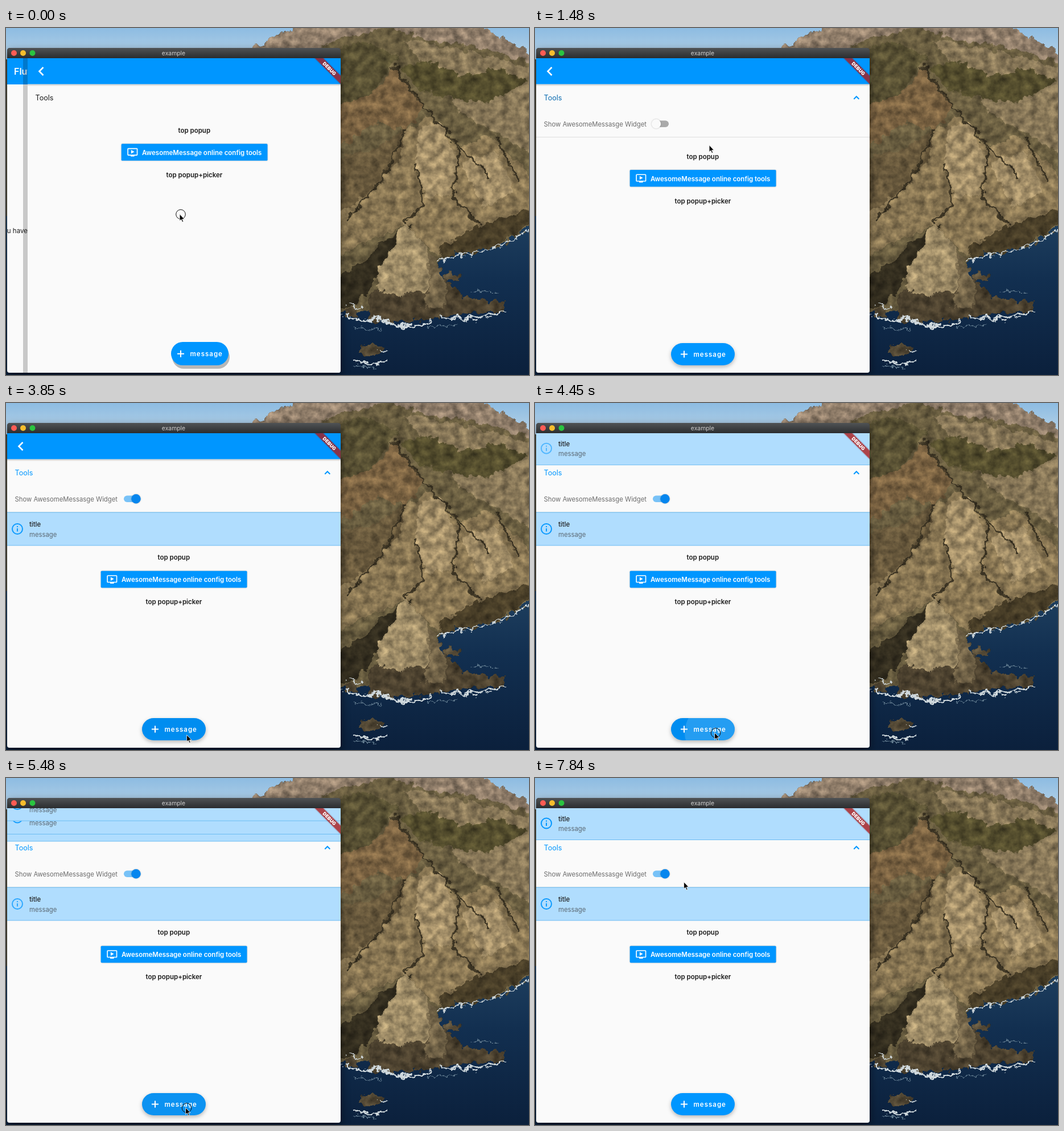
An HTML page for the animation above (7990 ms loop, 919 by 609 pixels).

```html
<!DOCTYPE html>
<html lang="en">
<head>
<meta charset="utf-8">
<title>Message popup demo</title>
<style>
  html, body { margin: 0; width: 100%; height: 100%; overflow: hidden; background: #10284a; }
  svg { position: absolute; inset: 0; width: 919px; height: 609px; }
  text { font: 11.5px Inter, Roboto, sans-serif; fill: #1c1c1c; white-space: pre; }
  .medium { font-weight: 500; }
  .bold { font-weight: 600; }
  .center { text-anchor: middle; }
  .white { fill: #fff; }
  .line { fill: none; stroke-width: 2; }
  .raised { filter: drop-shadow(0 .8px .8px #0004); }
  #notice .icon { opacity: var(--pulse); }
</style>
</head>
<body>

<!-- Coast -->
<svg viewBox="0 0 919 609">
  <defs>
    <linearGradient id="sky" x2="0" y2="1">
      <stop stop-color="#8dbce2"/><stop offset="1" stop-color="#c3d8e7"/>
    </linearGradient>
    <linearGradient id="sea" x2="0" y2="1">
      <stop stop-color="#1f4060"/><stop offset=".4" stop-color="#122f50"/><stop offset="1" stop-color="#0b203c"/>
    </linearGradient>
    <filter id="rock" x="0" y="0" width="919" height="609" filterUnits="userSpaceOnUse" color-interpolation-filters="sRGB">
      <feTurbulence type="fractalNoise" baseFrequency=".07" numOctaves="5" seed="8" result="noise"/>
      <feDisplacementMap in="SourceGraphic" in2="noise" scale="20" xChannelSelector="R" yChannelSelector="G" result="rough"/>
      <feColorMatrix in="noise" values="1 0 0 0 0  1 0 0 0 0  1 0 0 0 0  0 0 0 0 1" result="grain"/>
      <feComposite in="rough" in2="grain" operator="arithmetic" k1=".9" k2=".52" result="lit"/>
      <feComposite in="lit" in2="rough" operator="in"/>
    </filter>
    <filter id="spray" x="0" y="0" width="919" height="609" filterUnits="userSpaceOnUse">
      <feTurbulence type="fractalNoise" baseFrequency=".09" numOctaves="3" seed="3" result="noise"/>
      <feDisplacementMap in="SourceGraphic" in2="noise" scale="18" xChannelSelector="R" yChannelSelector="G"/>
    </filter>
  </defs>
  <rect width="919" height="70" fill="url(#sky)"/>
  <rect y="55" width="919" height="285" fill="#4b4736"/>
  <rect y="330" width="919" height="279" fill="url(#sea)"/>
  <g filter="url(#rock)">
    <path fill="#93806c" d="M425 40L465 18 500 2 530-15H800L860 8 930 50V120H425Z"/>
    <path fill="#6c6042" d="M530 50L565 25 610 14 670-3 740 22 820 30 930 62V345L860 385 770 402 690 490 580 498V50Z"/>
    <path fill="#8b7a5a" d="M700 20L800 38 930 72V225L870 190 800 150 730 60Z"/>
    <path fill="#57502f" d="M690 70L745 58 800 85 870 70 915 95 850 130 790 125 730 110Z"/>
    <path fill="#5b5335" d="M575 40L630 22 690 50 660 85 640 125 580 140Z"/>
    <path fill="#7f6644" d="M575 140L650 112 680 68 735 140 700 180 650 165 580 215Z"/>
    <path fill="#8c7955" d="M690 185L745 155 795 210 850 190 925 260V340L850 385 760 400 700 345 580 400V310L660 260Z"/>
    <path fill="#a6916a" d="M725 175L765 165 792 230 780 290 740 300 720 240ZM800 235L860 215 895 285 840 315Z"/>
    <path fill="#6b5b3e" d="M575 230L640 215 700 180 690 230 635 290 580 330Z"/>
    <path fill="#4b4029" d="M760 385L835 345 925 318V345L850 388 765 404Z"/>
    <path fill="#352f20" d="M575 445L620 415 665 372 712 345 680 400 640 455 610 490 575 490Z"/>
    <path fill="#4e4330" d="M635 470L690 440 760 430 800 470 875 482 875 498 790 503 720 515 640 515Z"/>
    <path fill="#a3906a" d="M700 342L740 385 758 435 740 462 700 470 655 462 650 435 680 385Z"/>
    <path fill="#75664a" d="M740 385L775 450 770 495 730 485 745 460Z"/>
    <path fill="#554a36" d="M622 560L645 550 662 566 650 577 625 578ZM595 493L615 490 618 506 597 506ZM770 432L795 430 797 442 772 444Z"/>
    <path fill="none" stroke="#3d3524" stroke-width="4" d="M680 65L735 140 790 200 850 260M700 180L665 260 600 335M720 240L735 310 700 342M795 210L785 300 830 340M860 190L900 270"/>
  </g>
  <g filter="url(#spray)" fill="none" stroke="#cfd8dc" stroke-linecap="round">
    <path stroke-width="4" d="M592 502L625 515 655 509 690 524 735 521 745 512"/>
    <path stroke-width="3" d="M765 507L800 511 845 506 878 497M612 583L640 590 668 584"/>
    <path stroke-width="2" d="M760 408L805 398 850 390 890 370 922 352M655 563L668 570M600 485L625 492"/>
    <path stroke="#6d8799" stroke-width="1.5" d="M610 525L660 530M745 525L790 521M820 460L865 466M650 597L610 592"/>
  </g>
</svg>

<!-- App window -->
<svg viewBox="0 0 919 609">
  <defs>
    <linearGradient id="bar" x2="0" y2="1"><stop stop-color="#505355"/><stop offset="1" stop-color="#2b2d2f"/></linearGradient>
    <linearGradient id="fade" x2="0" y2="1"><stop stop-color="#0003"/><stop offset="1" stop-color="#0000"/></linearGradient>
    <clipPath id="body"><path d="M2 53H588V601Q588 605 584 605H6Q2 605 2 601Z"/></clipPath>
    <clipPath id="panelClip"><rect id="panelArea" x="2" y="145" width="586"/></clipPath>
    <clipPath id="widgetClip"><rect id="widgetArea" x="2" y="191" width="586"/></clipPath>
    <clipPath id="fabClip"><rect id="fabArea" rx="20.5"/></clipPath>
    <g id="notice">
      <rect x="1" width="588" y=".5" height="58" fill="#b0ddfe" stroke="#6dbcf3"/>
      <g class="icon" stroke="#0096ff">
        <circle class="line" cx="20" cy="29.5" r="9"/>
        <path class="line" d="M20 28.5V34M20 24.5V26.5"/>
      </g>
      <text class="medium" x="41" y="25.5" style="font-size:11.3px">title</text>
      <text x="41" y="43" style="font-size:11.3px;fill:#5b6872">message</text>
    </g>
  </defs>

  <rect x="2" y="35" width="586" height="570" rx="5" fill="#222" style="filter:drop-shadow(0 6px 8px #0008)"/>

  <g clip-path="url(#body)">
    <g id="home">
      <rect y="53" width="600" height="552" fill="#fafafa"/>
      <rect y="53" width="600" height="46" fill="#0096ff"/>
      <text class="bold white" x="14" y="82" style="font-size:16px">Flutter Demo</text>
      <text x="-12" y="360">You have pushed the button</text>
    </g>

    <g id="page">
      <rect x="-6" y="53" width="8" height="552" fill="#0003"/>
      <rect x="2" y="53" width="586" height="552" fill="#fafafa"/>
      <rect x="2" y="98.5" width="586" height="4" fill="url(#fade)"/>
      <rect x="2" y="53" width="586" height="45.5" fill="#0096ff"/>
      <path class="line" stroke="#fff" style="stroke-width:2.6" d="M29.5 69L22.5 76 29.5 83"/>
      <text id="tools" x="15.5" y="126.7">Tools</text>
      <path id="chevron" class="line" d="M-4.5 2.2L0-2.3 4.5 2.2"/>

      <g clip-path="url(#panelClip)">
        <text x="15.5" y="173" style="font-size:11.3px;fill:#6c6c6c">Show AwesomeMessasge Widget</text>
        <rect id="track" x="207" y="162.5" width="28" height="11.5" rx="5.75"/>
        <circle id="thumb" class="raised" cy="168.3" r="8.2"/>
      </g>
      <rect id="divider" x="2" width="586" height="1" fill="#dedede"/>
      <g clip-path="url(#widgetClip)"><use id="widget" href="#notice" y="191.5"/></g>

      <g id="content">
        <text class="bold center" x="294.8" y="184">top popup</text>
        <rect class="raised" x="166.7" y="203.3" width="256.8" height="29.5" rx="1.6" fill="#0096ff"/>
        <path class="white" transform="translate(176.5 208.3) scale(.82)" d="M21 3H3c-1.1 0-2 .9-2 2v12c0 1.1.9 2 2 2h5v2h8v-2h5c1.1 0 2-.9 2-2V5c0-1.1-.9-2-2-2zm0 14H3V5h18v12zm-5-6l-7 4V7z"/>
        <text class="bold white" x="203" y="223">AwesomeMessage online config tools</text>
        <text class="bold center" x="295" y="262">top popup+picker</text>
      </g>
    </g>

    <rect id="fabBody" rx="20.5" fill="#0096ff"/>
    <g clip-path="url(#fabClip)">
      <rect id="fabHover" x="200" y="540" width="220" height="60"/>
      <circle id="ripple" cx="317" cy="579" fill="#fff"/>
    </g>
    <g id="fabLabel">
      <path class="line" stroke="#fff" d="M256 572.5H268M262 566.5V578.5"/>
      <text class="bold white" x="278.5" y="577" letter-spacing="1">message</text>
    </g>

    <use class="popup" href="#notice"/>
    <use class="popup" href="#notice"/>
    <use class="popup" href="#notice"/>

    <g transform="translate(568.3 71.2) rotate(45)">
      <rect class="raised" x="-40" y="-5.3" width="80" height="10.6" fill="#b71c1c" fill-opacity=".74"/>
      <text class="center white" y="3" style="font-size:8.4px;font-weight:900">DEBUG</text>
    </g>
  </g>

  <path d="M2 53V40Q2 35 7 35H583Q588 35 588 40V53Z" fill="url(#bar)"/>
  <circle cx="14" cy="44" r="5" fill="#ff5c54"/>
  <circle cx="30" cy="44" r="5" fill="#f5bd2d"/>
  <circle cx="46.5" cy="44" r="5" fill="#2ac440"/>
  <text class="center" x="294.5" y="48" style="font-size:10.4px;fill:#cfcfcf">example</text>

  <g id="cursor">
    <circle id="ring" cx="1.5" r="8.3" fill="none" stroke="#111"/>
    <path transform="translate(-.4 -.4) scale(.8)" stroke="#fff" d="M0 0V15L3.4 11.8 5.9 17.5 8.2 16.5 5.8 11H10.5Z"/>
  </g>
</svg>

<script>
const DURATION = 7990, STEPS = 54;
const POPUP_STARTS = [4006, 5245, 5428], PRESSES = [4000, 4800];
const CLICKS = [[0, 200], [1150, 1320], [1830, 2000], [3980, 4500], [5180, 5600]];
// Pointer path: time, x, y
const CURSOR = [
  [0, 305.5, 327], [300, 305.5, 327], [900, 307, 126], [1260, 307, 126], [1480, 306.5, 206],
  [1830, 226, 172], [2600, 226, 172], [3250, 320, 592], [3550, 318, 583], [3850, 318, 583],
  [3980, 316, 579], [5800, 316, 579], [6070, 360, 270], [6660, 406, 157], [7240, 406, 157], [7840, 262, 183]
];
const INK = [28, 28, 28], BLUE = [0, 150, 255];

const $ = id => document.getElementById(id);
const popups = document.querySelectorAll('.popup');
const progress = (t, start, length) => Math.min(1, Math.max(0, (t - start) / length));
const ease = p => p * p * (3 - 2 * p);
const mix = (a, b, p) => a + (b - a) * p;
const mixColor = (a, b, p) => `rgb(${a.map((v, i) => mix(v, b[i], p))})`;
const pulse = (t, peak, low) => mix(low, 1, .5 + .5 * Math.cos(Math.PI * (t - peak) / 1000));
const set = (id, attrs) => Object.entries(attrs).forEach(([key, value]) => $(id).setAttribute(key, value));

function cursorAt(t) {
  const next = CURSOR.findIndex(k => k[0] > t);
  if (next < 0) return CURSOR.at(-1).slice(1);
  const [a, b] = [CURSOR[next - 1], CURSOR[next]];
  const p = ease(progress(t, a[0], b[0] - a[0]));
  return [mix(a[1], b[1], p), mix(a[2], b[2], p)];
}

function drawPage(t, slide) {
  const opened = ease(progress(t, 1180, 270));
  const tint = progress(t, 1330, 230);
  const on = ease(progress(t, 1880, 220));
  const shown = ease(progress(t, 1920, 330));

  set('home', { transform: `translate(${-12 * (1 - slide)})`, visibility: slide ? 'visible' : 'hidden' });
  set('page', { transform: `translate(${36 * slide})` });
  set('tools', { style: `font-size:12.6px;fill:${mixColor(INK, BLUE, tint)}` });
  set('chevron', {
    transform: `translate(564.8 122.5) rotate(${180 * (1 - opened)})`,
    stroke: mixColor([115, 115, 115], BLUE, opened)
  });
  set('panelArea', { height: 46 * opened });
  set('divider', { y: 145 + 46 * opened, opacity: opened });
  set('track', { fill: mixColor([170, 170, 170], [120, 194, 247], on) });
  set('thumb', { cx: mix(213, 228.5, on), fill: mixColor([250, 250, 250], [5, 134, 238], on) });
  set('widgetArea', { height: 60 * shown });
  set('content', { transform: `translate(0 ${45.7 * (opened + shown)})` });
  $('widget').style.setProperty('--pulse', pulse(t, 2150, .65));
}

function drawFab(t, slide) {
  const width = mix(112, 101, slide), height = mix(39, 41, slide);
  const box = { x: 295 + 45.5 * slide - width / 2, y: 572.5 - slide - height / 2, width, height };
  const shadow = `${2 * slide}px ${mix(3, 6, slide)}px ${3.5 * (1 - slide)}px #0004`;
  set('fabBody', { ...box, style: `filter:drop-shadow(${shadow})` });
  set('fabArea', box);
  set('fabLabel', { transform: `translate(${45 * slide} ${-.7 * slide})` });
  set('fabHover', { opacity: t > 3300 && t < 5900 ? .06 : 0 });
  const press = PRESSES.findLast(start => t >= start) ?? -DURATION;
  set('ripple', {
    r: 80 * progress(t, press, 680) ** .9,
    opacity: .14 * (1 - progress(t, press + 460, 330))
  });
}

function drawPopups(t) {
  const leaving = 2.5 * ease(progress(t, 7390, 450));
  popups.forEach((popup, i) => {
    const p = progress(t, POPUP_STARTS[i], 600);
    const bottom = 53 + 58.5 * Math.sqrt(1 - (1 - p) ** 2) - leaving;
    popup.setAttribute('y', bottom - 59);
    popup.setAttribute('visibility', p ? 'visible' : 'hidden');
    popup.style.setProperty('--pulse', pulse(t, 1750, .4));
  });
}

const start = performance.now();

function frame() {
  // Motion is held between equal steps, like a screen recording.
  const elapsed = (performance.now() - start) % DURATION;
  const step = Math.floor(elapsed * STEPS / DURATION + .1) % STEPS;
  const t = step * DURATION / STEPS;
  const slide = (1 - progress(t, 0, 450)) ** 2;
  drawPage(t, slide);
  drawFab(t, slide);
  drawPopups(t);
  set('cursor', { transform: `translate(${cursorAt(t)})` });
  set('ring', { opacity: CLICKS.some(([from, to]) => t >= from && t < to) ? 1 : 0 });
  requestAnimationFrame(frame);
}
frame();
</script>
</body>
</html>
```
